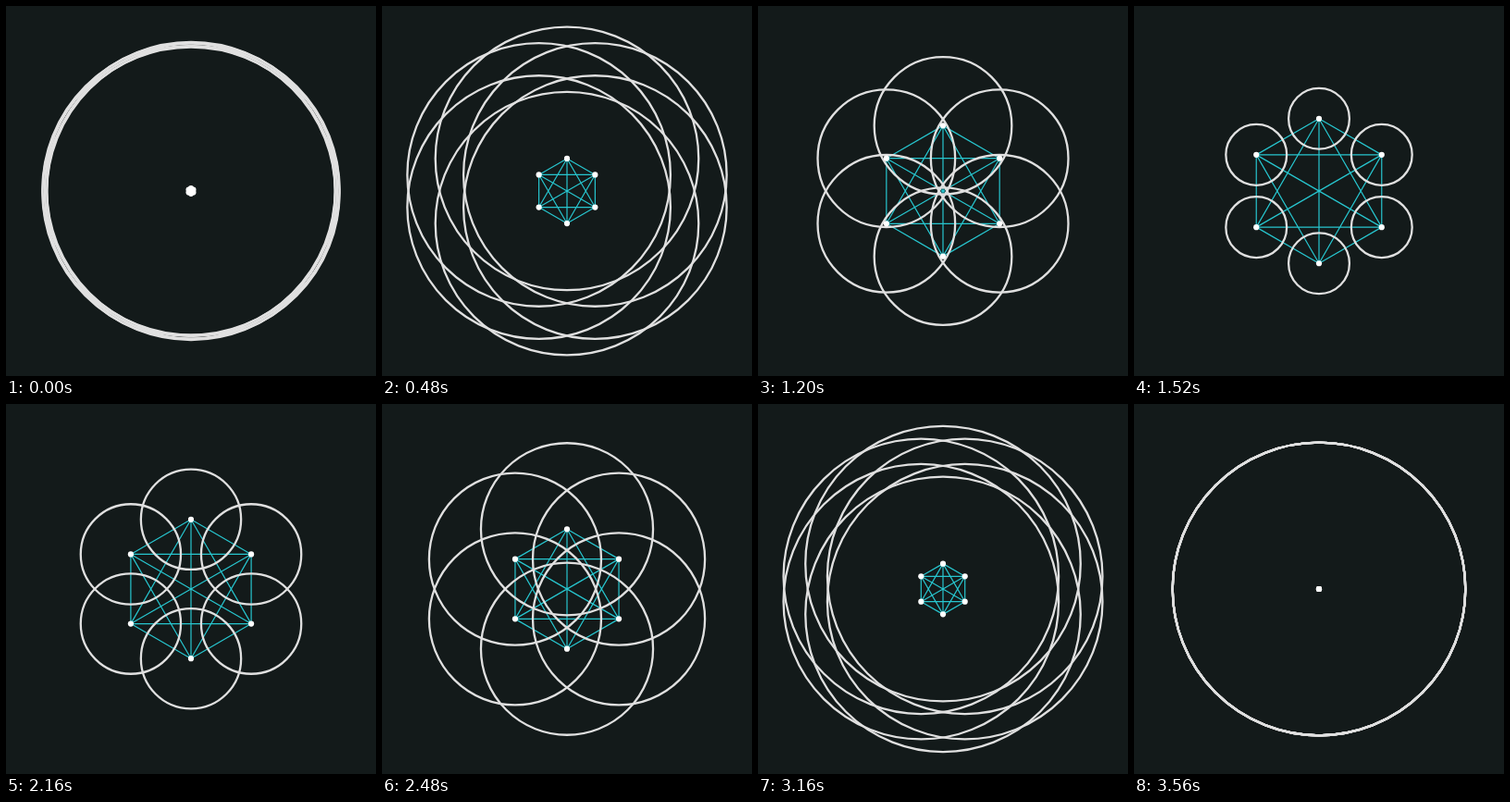
Animation of 400x400 px, one loop 3.6 s. Source, as an HTML page with a canvas:

```html
<!DOCTYPE html>
<html lang="en">
<head>
<meta charset="utf-8">
<title>Six circles</title>
<style>
  html, body { margin: 0; width: 100%; height: 100%; overflow: hidden; background: #131a1a; }
  canvas { display: block; width: 400px; height: 400px; }
</style>
</head>
<body>
<canvas id="stage" width="400" height="400"></canvas>
<script>
const ctx = document.getElementById('stage').getContext('2d');
const LOOP = 3600, STEP = 40;
const SPREAD = 80, RADIUS = 158.3, DOT = 3.1;

function circle(x, y, r) {
  ctx.beginPath();
  ctx.arc(x, y, r, 0, Math.PI * 2);
}

function draw(time) {
  const step = Math.floor((time % LOOP) / STEP) + 1;
  const phase = Math.PI * step * STEP / LOOP;
  const spread = SPREAD * Math.sin(phase);
  const radius = RADIUS * Math.abs(Math.cos(phase));
  const points = Array.from({ length: 6 }, (_, i) => {
    const a = (i / 3 - 0.5) * Math.PI;
    return [200 + spread * Math.cos(a), 200 + spread * Math.sin(a)];
  });

  ctx.fillStyle = '#131a1a';
  ctx.fillRect(0, 0, 400, 400);

  // Every pair of centres is joined
  ctx.strokeStyle = '#27c6cf';
  ctx.lineWidth = 1.2;
  ctx.beginPath();
  points.forEach((p, i) => points.slice(i + 1).forEach(q => {
    ctx.moveTo(...p);
    ctx.lineTo(...q);
  }));
  ctx.stroke();

  ctx.strokeStyle = '#e0e0e0';
  ctx.lineWidth = 2.3;
  for (const [x, y] of points) {
    circle(x, y, radius);
    ctx.stroke();
  }

  ctx.fillStyle = '#fff';
  for (const [x, y] of points) {
    circle(x, y, DOT);
    ctx.fill();
  }
}

let start;
function tick(now) {
  start ??= now;
  draw(now - start);
  requestAnimationFrame(tick);
}
draw(0);
requestAnimationFrame(tick);
</script>
</body>
</html>
```
